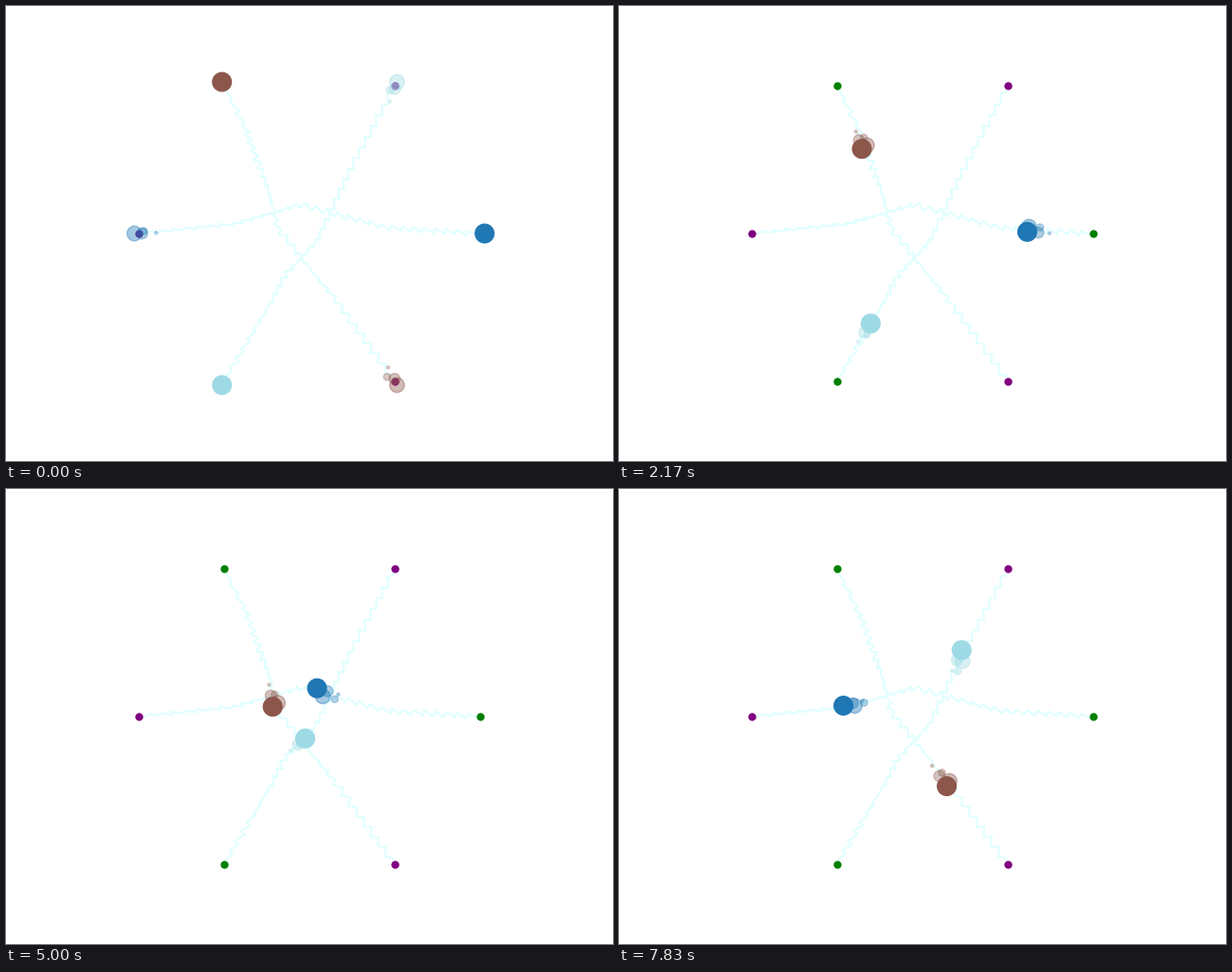
A matplotlib script for the animation above (8 s loop, 640x480 px).

```python
import numpy as np
import matplotlib.pyplot as plt
from matplotlib.animation import FuncAnimation

W, H, DPI = 640, 480, 100
LOOP = 8000            # ms
TICK = 25              # ms per drawn frame
STEP_MS = 1000 / 6     # the robots hop six times a second
LAST = 63              # step on which the goal is reached
MID = np.array([W / 2, H / 2])
R = 480 / 2.6          # robots start and end on a circle of this radius
LINE_SCALE = 0.975     # the drawn course lies slightly inside the driven one
ZIG = 3.5              # sideways swing in pixels
TRAIL = 4


def rim(deg, r=R):
    a = np.radians(deg)
    return MID + r * np.array([np.cos(a), -np.sin(a)])


def course(start, goal, keys, swing, turn):
    """Drive through keys (step, x, y), swinging to alternate sides.

    The swing direction eases from one angle to another over the steps in turn.
    """
    t = np.arange(LAST + 1)
    keys = np.array([(0, *rim(start)), *keys, (LAST, *rim(goal))])
    base = np.column_stack([np.interp(t, keys[:, 0], keys[:, i]) for i in (1, 2)])
    u = np.clip((t - turn[0]) / (turn[1] - turn[0]), 0, 1)
    angle = np.radians(swing[0] + (swing[1] - swing[0]) * u * u * (3 - 2 * u))
    amp = ZIG * (-1.0) ** t * np.clip(np.minimum(t / 3, (LAST - t) / 2), 0, 1)
    return base + amp[:, None] * np.column_stack([np.cos(angle), np.sin(angle)])


starts, goals = (0, 120, 240), (180, 300, 60)
paths = [
    course(0, 180, [(17, 405, 234), (33, 310, 209), (47, 240, 229.5)],
           swing=(-125, 20), turn=(20, 50)),
    course(120, 300, [(7, 250, 125), (23, 275.5, 194), (31, 286, 235), (47, 349, 313)],
           swing=(20, -400), turn=(7, 55)),
    course(240, 60, [(17, 280, 311.5), (23, 293, 286), (33, 327.5, 249), (47, 363, 173)],
           swing=(-10, -300), turn=(5, 40)),
]
colors = plt.cm.tab20(np.linspace(0, 1, 3))

fig = plt.figure(figsize=(W / DPI, H / DPI), dpi=DPI, facecolor="white")
ax = fig.add_axes([0, 0, 1, 1])
ax.set_xlim(0, W)
ax.set_ylim(H, 0)
ax.axis("off")

for path in paths:
    ax.plot(*(MID + (path - MID) * LINE_SCALE).T, color="lightcyan", lw=1.5, zorder=1)
for degs, color in ((starts, "green"), (goals, "purple")):
    for deg in degs:
        ax.plot(*rim(deg, R * LINE_SCALE), "o", color=color, ms=5, zorder=2)


def dots(scale, alpha, z):
    return ax.scatter([0] * 3, [0] * 3, s=200 * scale ** 2, c=colors,
                      alpha=alpha, zorder=z)


# the body comes first, then ever smaller and fainter ghosts of earlier steps
layers = [dots(1, 1, 10)]
layers += [dots(1 - 0.21 * k, 0.44 - 0.04 * k, 10 - k) for k in range(1, TRAIL + 1)]


def update(frame):
    # a small lead lets each hop land on the nearest earlier tick
    step = int((frame * TICK + 20) / STEP_MS)
    for lag, layer in enumerate(layers):
        layer.set_offsets([p[(step - lag) % (LAST + 1)] for p in paths])
    return layers


anim = FuncAnimation(fig, update, frames=LOOP // TICK, interval=TICK,
                     repeat=True, repeat_delay=0, blit=False)
plt.show()
```
